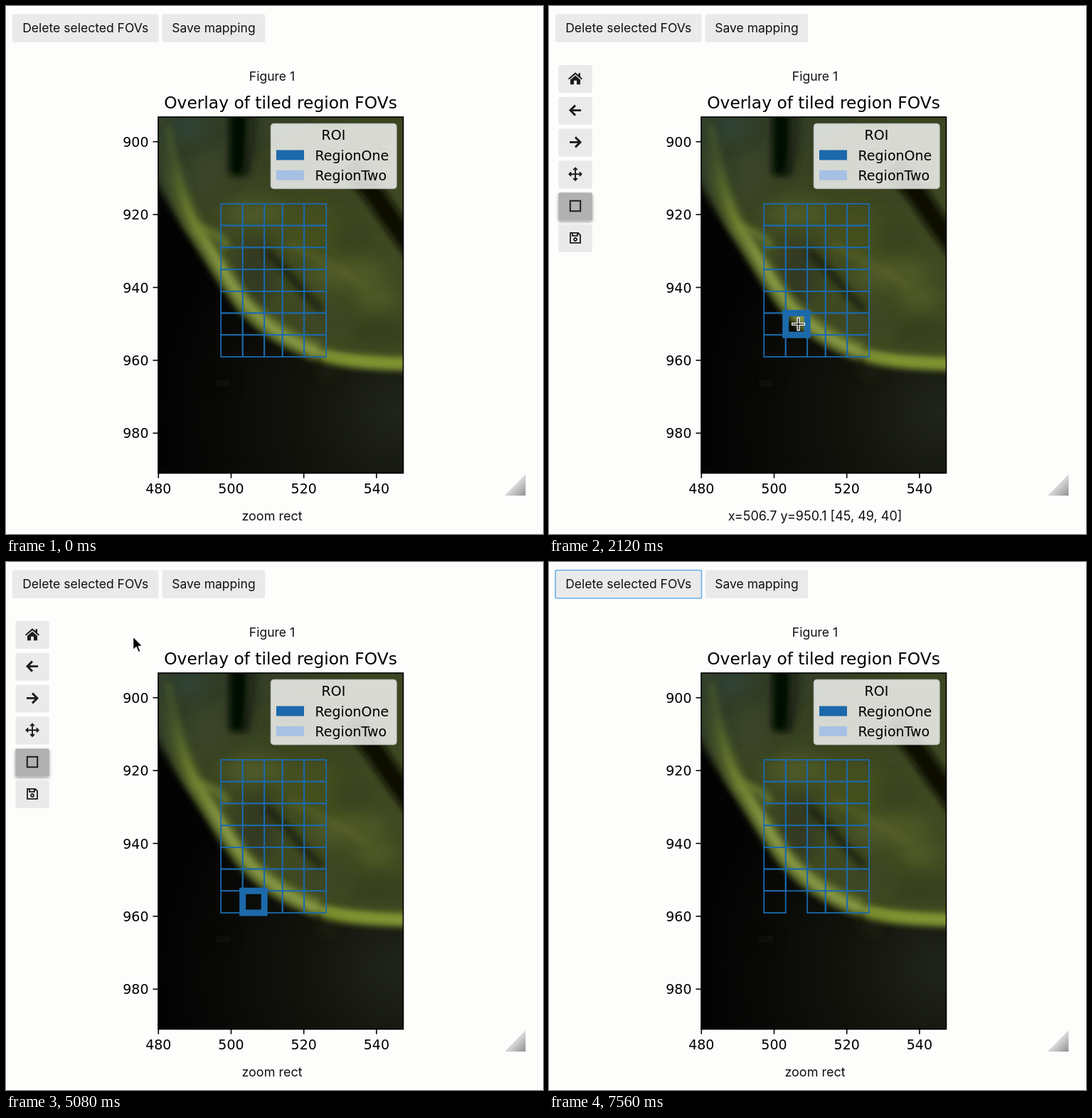
Write an HTML page that moves like this. It is 755 by 742 pixels and loops after 7.58 s.

```html
<!DOCTYPE html>
<html lang="en">
<head>
<meta charset="utf-8">
<style>
html, body { margin: 0; width: 100%; height: 100%; overflow: hidden; background: #fdfdfb; }
svg { display: block; width: 755px; height: 742px; }
.ui { font: 17.55px Inter, "Liberation Sans", sans-serif; fill: #111; }
.plot { font: 19px "DejaVu Sans", sans-serif; fill: #000; }
#title { font-size: 23.35px; }
#status { font-size: 18px; }
.mid { text-anchor: middle; }
.end { text-anchor: end; }
</style>
</head>
<body>
<svg id="stage" viewBox="0 0 755 742" xmlns="http://www.w3.org/2000/svg">
  <defs>
    <clipPath id="axes"><rect x="214" y="156" width="344" height="500"/></clipPath>
    <linearGradient id="grip" x1="0" y1="0" x2="1" y2="1">
      <stop offset=".45" stop-color="#e2e2e2"/><stop offset="1" stop-color="#8f8f8f"/>
    </linearGradient>
    <radialGradient id="floor" gradientUnits="userSpaceOnUse" cx="550" cy="570" r="330">
      <stop offset="0" stop-color="#20241a"/><stop offset=".45" stop-color="#10120b"/><stop offset="1" stop-color="#030303"/>
    </radialGradient>
    <linearGradient id="tissue" gradientUnits="userSpaceOnUse" x1="230" y1="156" x2="420" y2="460">
      <stop offset="0" stop-color="#2d3a29"/><stop offset=".45" stop-color="#3b4522"/><stop offset="1" stop-color="#404a22"/>
    </linearGradient>
    <linearGradient id="rim" gradientUnits="userSpaceOnUse" x1="225" y1="190" x2="300" y2="370">
      <stop offset="0" stop-color="#35432a"/><stop offset=".4" stop-color="#536328"/><stop offset="1" stop-color="#788a38"/>
    </linearGradient>
    <linearGradient id="crest" gradientUnits="userSpaceOnUse" x1="235" y1="215" x2="310" y2="370">
      <stop offset="0" stop-color="#43522a"/><stop offset=".5" stop-color="#74862f"/><stop offset="1" stop-color="#8e9f4a"/>
    </linearGradient>
    <filter id="soft2" filterUnits="userSpaceOnUse" x="150" y="90" width="480" height="630"><feGaussianBlur stdDeviation="3.2"/></filter>
    <filter id="soft5" filterUnits="userSpaceOnUse" x="150" y="90" width="480" height="630"><feGaussianBlur stdDeviation="5"/></filter>
    <filter id="soft12" filterUnits="userSpaceOnUse" x="150" y="90" width="480" height="630"><feGaussianBlur stdDeviation="11"/></filter>
    <filter id="shadow" x="-20%" y="-30%" width="140%" height="170%">
      <feDropShadow dx="0" dy="2" stdDeviation="2" flood-opacity=".4"/>
    </filter>
  </defs>
  <g id="buttons"></g>
  <g id="toolbar"></g>
  <text class="ui mid" x="374" y="105">Figure 1</text>
  <text id="title" class="plot mid" x="386" y="144">Overlay of tiled region FOVs</text>
  <g id="photo" clip-path="url(#axes)"></g>
  <g id="grid" fill="none" stroke="#1c6aab"></g>
  <g id="legend">
    <rect x="372.5" y="165.5" width="176.5" height="91" rx="4" fill="#fff" fill-opacity=".8" stroke="#ccc" stroke-opacity=".8" stroke-width="1.5"/>
    <rect x="380" y="202.5" width="39" height="14" fill="#1b68ab"/>
    <rect x="380" y="230.8" width="39" height="14" fill="#a6c1e4"/>
    <text class="plot mid" x="460.5" y="188">ROI</text>
    <text class="plot" x="434.5" y="216.5">RegionOne</text>
    <text class="plot" x="434.5" y="244.5">RegionTwo</text>
  </g>
  <rect x="214" y="156" width="344.5" height="500.5" fill="none" stroke="#000" stroke-width="1.6"/>
  <g id="ticks" stroke-width="1.6"></g>
  <path d="M730.5 658V688H701Z" fill="url(#grip)"/>
  <text id="status" class="ui mid" x="374" y="723"></text>
  <g id="cursor">
    <path id="arrow" d="M0 0V19.5L4.6 15.3 7.6 22.4 10.8 21 7.8 14.1H14Z" fill="#000" stroke="#fff" stroke-width="1.5" stroke-linejoin="round"/>
    <g id="cross" fill="none">
      <path d="M-9.5 0H9.5M0-9.5V9.5" stroke="#fff" stroke-width="4.2"/>
      <path d="M-8.3 0H8.3M0-8.3V8.3" stroke="#222" stroke-width="1.6"/>
    </g>
    <path id="hand" d="M-2 1.5Q-1.5-1 .6-.4L2 1 4.6 7.2 6 6Q8 5.3 8.8 7.4 10.2 5.9 11.8 8 14 7.2 14.4 10L14.7 14.5 13 18V21H4.2L3.3 18.6-3.6 13.3Q-5.5 10.5-2.6 10.6L1 12.3Z" fill="#fff" stroke="#111" stroke-width="1.5" stroke-linejoin="round"/>
  </g>
</svg>
<script>
const LOOP = 7580;
const $ = id => document.getElementById(id);

function add(parent, tag, attrs, text) {
  const node = document.createElementNS("http://www.w3.org/2000/svg", tag);
  for (const key in attrs) node.setAttribute(key, attrs[key]);
  if (text !== undefined) node.textContent = text;
  parent.appendChild(node);
  return node;
}
const show = (node, on) => node.setAttribute("visibility", on ? "visible" : "hidden");

// Push buttons
function pushButton(x, width, label) {
  const box = add($("buttons"), "rect", { x, y: 11.5, width, height: 39.5, rx: 2, fill: "#eaeaea" });
  add($("buttons"), "text", { class: "ui mid", x: x + width / 2, y: 37 }, label);
  return box;
}
const deleteButton = pushButton(9, 205.5, "Delete selected FOVs");
pushButton(219.7, 144.5, "Save mapping");

// Toolbar icons are drawn around their own centre
const LEFT = "M8 0H-6M0-7L-7 0 0 7";
const ICONS = [
  { d: "M0-8.5L-10 .3-8.8 1.8 0-5.8 8.8 1.8 10 .3 7-2.4V-7.5H4.5V-4.6ZM0-4L-7 2V8.5H-2V3H2V8.5H7V2Z", fill: "#1c1c1c" },
  { d: LEFT, line: 2.9 },
  { d: LEFT, line: 2.9, flip: true },
  { d: "M-8 0H8M0-8V8M-2.8-5.8L0-8.6 2.8-5.8M-2.8 5.8L0 8.6 2.8 5.8M-5.8-2.8L-8.6 0-5.8 2.8M5.8-2.8L8.6 0 5.8 2.8", line: 1.9 },
  { d: "M-7.2-7.2H7.2V7.2H-7.2Z", line: 2 },
  { d: "M-7-7H4L7-4V7H-7ZM-4-7V-3H3V-7M-2 2.2A2 2 0 1 0 2 2.2 2 2 0 1 0-2 2.2", line: 1.8 },
];
ICONS.forEach((icon, i) => {
  const y = 83 + i * 44.8, active = i === 4;
  add($("toolbar"), "rect", {
    x: 13.3, y, width: 47.5, height: 39, rx: 2,
    fill: active ? "#b1b1b1" : "#eaeaea", filter: active ? "url(#shadow)" : "none"
  });
  add($("toolbar"), "path", {
    d: icon.d, fill: icon.fill || "none", stroke: icon.line ? "#1c1c1c" : "none",
    "stroke-width": icon.line || 0,
    transform: `translate(37 ${y + 18.8})` + (icon.flip ? " scale(-1 1)" : "")
  });
});

// Soft microscope picture
const photo = $("photo");
const fillShape = (d, fill, blur, opacity = 1) =>
  add(photo, "path", { d, fill, opacity, filter: `url(#soft${blur})` });
const stroke = (d, color, width, blur, opacity = 1) =>
  add(photo, "path", { d, fill: "none", stroke: color, "stroke-width": width, opacity, filter: `url(#soft${blur})` });
const spot = (cx, cy, rx, ry, fill, opacity = 1) =>
  add(photo, "ellipse", { cx, cy, rx, ry, fill, opacity, filter: "url(#soft12)" });

const EDGE = "C218 262 240 302 264 330C286 356 304 392 330 425C358 460 395 484 440 497C480 510 520 512 600 513";
add(photo, "rect", { x: 214, y: 156, width: 344, height: 500, fill: "url(#floor)" });
fillShape("M180 100L196 215" + EDGE + "V100Z", "url(#tissue)", 5);
spot(255, 172, 28, 16, "#33463c", .7);
spot(350, 292, 48, 18, "#55642a", .7);
spot(425, 320, 45, 40, "#49531f", .7);
spot(285, 240, 22, 40, "#3c472a", .7);
spot(352, 375, 26, 45, "#303820", .9);
spot(480, 375, 55, 22, "#59642a", .6);
spot(520, 410, 28, 18, "#59662b", .6);
spot(490, 325, 28, 20, "#38411f", .8);
spot(525, 460, 45, 20, "#343d1b", .8);
spot(450, 445, 38, 18, "#3c4527", .8);
spot(450, 225, 80, 32, "#303b1e", .7);
stroke("M326 120C328 180 325 205 327 238", "#050703", 25, 5);
stroke("M346 120C350 190 345 215 335 235", "#1c2412", 12, 5, .7);
stroke("M485 225L518 265 542 300 575 345", "#080b05", 29, 5);
stroke("M365 344L393 372 423 407 444 428", "#1b2210", 10, 5);
stroke("M398 335C440 356 475 372 510 398", "#5b662b", 10, 5, .5);
stroke("M220 150C228 215 244 265 265 310C286 345 309 384 333 416C360 447 395 470 440 487", "url(#rim)", 25, 5, .75);
stroke("M228 170C238 240 254 292 272 317C292 348 311 385 335 415C360 445 396 470 437 487C475 498 520 502 575 503", "url(#crest)", 10, 2, .75);
stroke("M265 311C290 318 301 320 312 340", "#718333", 12, 5, .7);
stroke("M445 491C480 500 520 502 590 503", "#82952f", 18, 5, .85);
spot(452, 511, 12, 5, "#343d1d", .8);
spot(305, 530, 10, 9, "#171716", .8);

// Axis ticks and labels
for (let i = 0; i < 5; i++) {
  const y = 190.7 + i * 102.4;
  add($("ticks"), "path", { d: `M206.5 ${y}H214`, stroke: "#000" });
  add($("ticks"), "text", { class: "plot end", x: 200.5, y: y + 7 }, 900 + i * 20);
}
for (let i = 0; i < 4; i++) {
  const x = 214.3 + i * 102.2;
  add($("ticks"), "path", { d: `M${x} 656V663.5`, stroke: "#000" });
  add($("ticks"), "text", { class: "plot mid", x, y: 685 }, 480 + i * 20);
}

// Tiles
const COLS = [302.2, 332.7, 363.2, 388.7, 419.2, 450.2];
const ROWS = [278, 308.5, 339.3, 370.2, 401, 431.5, 462.2, 493];
const tiles = [];
for (let row = 0; row < 7; row++) {
  for (let col = 0; col < 5; col++) {
    tiles.push(add($("grid"), "rect", {
      x: COLS[col], y: ROWS[row], width: COLS[col + 1] - COLS[col],
      height: ROWS[row + 1] - ROWS[row], "stroke-width": 1.8
    }));
  }
}
const upperTile = tiles[26], lowerTile = tiles[31];
const select = (tile, on) => tile.setAttribute("stroke-width", on ? 9 : 1.8);

// Pointer path: time, x, y
const PATH = [
  [1000, 775, 690], [1480, 348.5, 443.5], [1700, 348.5, 443.5], [1900, 350.6, 447],
  [2250, 350.6, 447], [2600, 350.6, 488.8], [3200, 350.6, 488.8], [3560, 350.6, 460.6],
  [3750, 350.6, 460.6], [3950, 350.6, 447], [4500, 350.6, 447], [5000, 178.5, 104.5],
  [5120, 178.5, 104.5], [5480, 160, 48], [7020, 160, 48], [7090, 168, -40]
];
function pointerAt(t) {
  const next = PATH.findIndex(key => key[0] > t);
  if (next < 1) return null;
  const [t0, x0, y0] = PATH[next - 1], [t1, x1, y1] = PATH[next];
  const k = (t - t0) / (t1 - t0), ease = k * k * (3 - 2 * k);
  return { x: x0 + (x1 - x0) * ease, y: y0 + (y1 - y0) * ease };
}

function readout({ x, y }) {
  const dataX = 480 + (x - 214.3) / 5.11, dataY = 900 + (y - 190.7) / 5.12;
  const glow = Math.min(1, Math.max(0, (957 - Math.round(dataY)) / 12));
  const rgb = [74, 80, 65].map(v => Math.round(5 + (v - 5) * glow));
  return `x=${dataX.toFixed(1)} y=${dataY.toFixed(1)} [${rgb.join(", ")}]`;
}

function render(t) {
  const p = pointerAt(t);
  const live = t >= 1540 && t < 5400;
  const inAxes = p && live && p.x > 214 && p.x < 558 && p.y > 156 && p.y < 656;
  const onButton = p && t > 5300 && p.x > 9 && p.x < 214 && p.y > 9 && p.y < 52;
  const pressed = t >= 5680 && t < 5980, focused = t >= 5680;

  show($("toolbar"), live);
  $("status").textContent = inAxes ? readout(p) : "zoom rect";
  select(upperTile, t >= 2120 && t < 4150);
  select(lowerTile, t >= 2960 && t < 6300);
  show(lowerTile, t < 6300);

  deleteButton.setAttribute("fill", pressed ? "#b1b1b1" : "#eaeaea");
  deleteButton.setAttribute("stroke", focused ? "#68aee9" : "none");
  deleteButton.setAttribute("stroke-width", 1.6);
  deleteButton.setAttribute("filter", onButton && !pressed ? "url(#shadow)" : "none");

  if (p) $("cursor").setAttribute("transform", `translate(${p.x} ${p.y})`);
  show($("cross"), inAxes);
  show($("hand"), onButton);
  show($("arrow"), p && !inAxes && !onButton);
}

const start = performance.now();
function frame(now) {
  render(Math.max(0, now - start) % LOOP);
  requestAnimationFrame(frame);
}
render(0);
requestAnimationFrame(frame);
</script>
</body>
</html>
```
